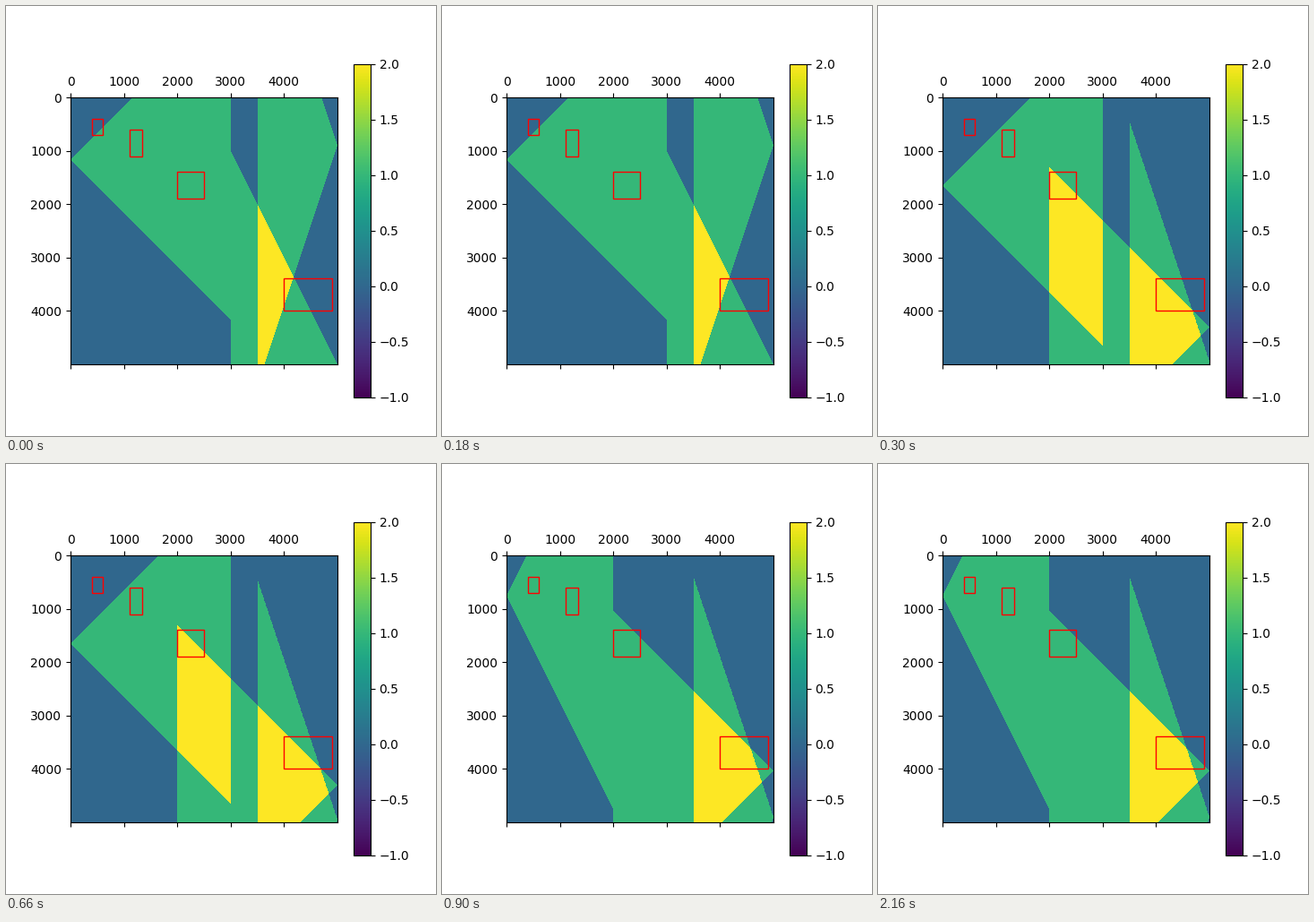
A matplotlib script for the animation above (3 s loop, 480x480 px).

```python
import numpy as np
import matplotlib.pyplot as plt
from matplotlib.animation import FuncAnimation
from matplotlib.patches import Rectangle

SIZE = 5000
STEP = 2
FRAMES = 10
INTERVAL = 300
CUTS = 300, 900  # ms at which the sensors jump to a new pose

axis = np.arange((STEP - 1) / 2, SIZE, STEP)
X, Y = axis[None, :], axis[:, None]


def cone(wall, apex, slope):
    """Field of view from a point on a wall: the wider it opens, the shorter it reaches."""
    depth = abs(X - wall)
    reach = 6000 / (slope + 1)
    return (depth <= reach) & (abs(Y - apex) <= slope * depth)


def coverage(left, right, steep):
    cones = cone(0, *left), cone(SIZE, *right), cone(SIZE, steep, 3)
    return np.sum(cones, axis=0, dtype=np.uint8)


# (apex, slope) of the left and right sensors, apex of the steep one
maps = [
    coverage((1160, 1), (5000, 2), 900),
    coverage((1650, 1), (4300, 1), 4950),
    coverage((750, 2), (4040, 1), 4900),
]

fig = plt.figure(figsize=(4.8, 4.8), dpi=100)
ax = fig.add_axes([0.15, 0.09, 0.775, 0.775])
image = ax.matshow(maps[0], vmin=-1, vmax=2, cmap="viridis",
                   interpolation="nearest",
                   extent=(-0.5, SIZE - 0.5, SIZE - 0.5, -0.5))
fig.colorbar(image, ax=ax)


def mark(x, y, w, h):
    ax.add_patch(Rectangle((x, y), w, h, fill=False, edgecolor="red", linewidth=1))


mark(400, 400, 200, 300)
mark(1100, 600, 250, 500)
mark(2000, 1400, 500, 500)
mark(4000, 3400, 900, 600)


def update(frame):
    pose = sum(frame * INTERVAL >= cut for cut in CUTS)
    image.set_data(maps[pose])
    return [image]


anim = FuncAnimation(fig, update, frames=FRAMES, interval=INTERVAL,
                     repeat=True, repeat_delay=0)
plt.show()
```
